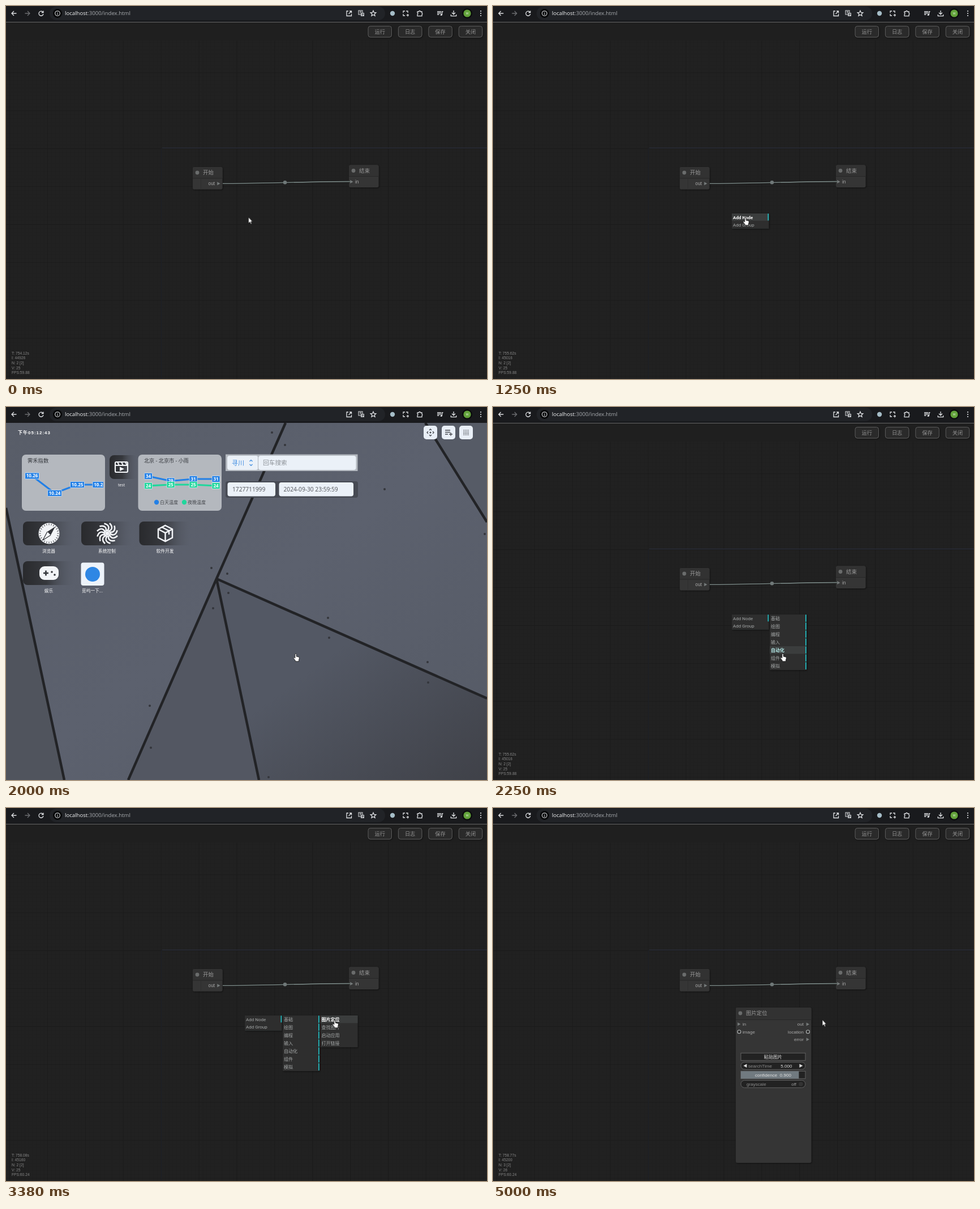
These frames come from a looping animation (850 px wide and 658 px high, 5130 ms). An HTML page:

```html
<!DOCTYPE html>
<html lang="zh">
<head>
<meta charset="utf-8">
<title>Node editor</title>
<style>
html, body { margin: 0; width: 100%; height: 100%; overflow: hidden; background: #212121; }
svg { display: block; width: 850px; height: 658px; }
text { white-space: pre; }
.ui { font-family: "Open Sans", "Noto Sans CJK SC", "Noto Sans CJK", sans-serif; }
.cv { font-family: "Liberation Sans", "Noto Sans CJK SC", "Noto Sans CJK", sans-serif; }
.mn { font-family: Roboto, "Noto Sans CJK SC", "Noto Sans CJK", sans-serif; }
.t { animation: 5130ms step-end infinite; }

/* Visibility windows: hidden, shown, hidden again */
@keyframes menu1 { 0%, 75.63% { visibility: hidden } 14.62% { visibility: visible } }
@keyframes menu2 { 0%, 75.63% { visibility: hidden } 29.24% { visibility: visible } }
@keyframes menu3 { 0%, 75.63% { visibility: hidden } 51.27% { visibility: visible } }
@keyframes overAdd { 0%, 31.77% { visibility: hidden } 14.62% { visibility: visible } }
@keyframes overDraw { 0%, 34.11% { visibility: hidden } 31.77% { visibility: visible } }
@keyframes overInput { 0%, 36.65% { visibility: hidden } 34.11% { visibility: visible } }
@keyframes overAuto { 0%, 58.48% { visibility: hidden } 43.86% { visibility: visible } }
@keyframes overLaunch { 0%, 61.01% { visibility: hidden } 58.48% { visibility: visible } }
@keyframes overFind { 0%, 63.35% { visibility: hidden } 61.01% { visibility: visible } }
@keyframes overLocate { 0%, 75.63% { visibility: hidden } 63.35% { visibility: visible } }
@keyframes desk { 0%, 43.86% { visibility: hidden } 38.99% { visibility: visible } }
@keyframes added { 0% { visibility: hidden } 75.63% { visibility: visible } }
@keyframes stats1 { 0% { visibility: visible } 14.62% { visibility: hidden } }
@keyframes stats2 { 0%, 63.35% { visibility: hidden } 14.62% { visibility: visible } }
@keyframes stats3 { 0%, 75.63% { visibility: hidden } 63.35% { visibility: visible } }
@keyframes arrow { 0%, 75.63% { visibility: visible } 14.62% { visibility: hidden } }
@keyframes hand { 0%, 75.63% { visibility: hidden } 14.62% { visibility: visible } }
@keyframes pointer {
  0% { transform: translate(428.5px, 372.5px) }
  24.37% { transform: translate(446px, 373px) }
  29.24% { transform: translate(470px, 375px) }
  31.77% { transform: translate(492px, 384px) }
  34.11% { transform: translate(505px, 411px) }
  36.65% { transform: translate(512px, 435px) }
  53.61% { transform: translate(518px, 431px) }
  56.14% { transform: translate(535px, 426px) }
  58.48% { transform: translate(560px, 402px) }
  61.01% { transform: translate(572px, 387px) }
  63.35% { transform: translate(578px, 378px) }
  65.89% { transform: translate(581px, 374px) }
  75.63%, 100% { transform: translate(582px, 373.5px) }
}
</style>
</head>
<body>
<svg id="stage" viewBox="0 0 850 658"></svg>
<script>
const rect = (x, y, w, h, fill, extra = '') =>
  `<rect x="${x}" y="${y}" width="${w}" height="${h}" fill="${fill}" ${extra}/>`;
const dot = (x, y, r, fill, extra = '') =>
  `<circle cx="${x}" cy="${y}" r="${r}" fill="${fill}" ${extra}/>`;
const line = (d, stroke, width = 1, extra = '') =>
  `<path d="${d}" fill="none" stroke="${stroke}" stroke-width="${width}" ${extra}/>`;
const shape = (d, fill, extra = '') => `<path d="${d}" fill="${fill}" ${extra}/>`;
// y is the middle of the line of text
const text = (x, y, str, size, fill, extra = '') =>
  `<text x="${x}" y="${(y + size * .36).toFixed(2)}" font-size="${size}" fill="${fill}" ${extra}>${str}</text>`;
const timed = (name, body) => `<g class="t" style="animation-name:${name}">${body}</g>`;
const at = (x, y, body) => `<g transform="translate(${x} ${y})">${body}</g>`;
const mid = 'text-anchor="middle"', end = 'text-anchor="end"', bold = 'font-weight="700"';
const shade = 'filter="url(#shade)"';

const defs = `<defs>
  <filter id="shade" x="-20%" y="-20%" width="140%" height="140%">
    <feDropShadow dx="1" dy="1" stdDeviation="1.6" flood-color="#000" flood-opacity=".5"/></filter>
  <pattern id="fine" width="6.69" height="6.69" patternUnits="userSpaceOnUse" x="6.5" y="50.5">
    <path d="M0 .5H6.69M.5 0V6.69" stroke="#1f1f1f"/></pattern>
  <pattern id="coarse" width="66.9" height="66.9" patternUnits="userSpaceOnUse" x="6" y="50.4">
    <path d="M0 .5H66.9M.5 0V66.9" stroke="#1b1b1b"/></pattern>
  <linearGradient id="fade"><stop stop-color="#292a2d"/><stop offset=".45" stop-color="#36383d"/>
    <stop offset="1" stop-color="#565b66" stop-opacity="0"/></linearGradient>
  <linearGradient id="wall" x2="1" y2="1"><stop stop-color="#585d68"/>
    <stop offset=".5" stop-color="#5c616e"/><stop offset="1" stop-color="#555a65"/></linearGradient>
  <linearGradient id="corner" x2="1" y2="1"><stop offset=".4" stop-color="#535864"/>
    <stop offset="1" stop-color="#3f4148"/></linearGradient>
  <clipPath id="card"><rect x="28" y="84" width="144" height="99"/></clipPath>
</defs>`;

function toolbar() {
  const ink = '#dfe1e4';
  const icon = (x, d, color = ink) => at(x, 13, line(d, color, 1.3));
  return rect(0, 0, 850, 28, '#191a1d') + rect(77, 1, 593, 24, '#212327', 'rx="12"') +
    icon(14, 'M4.5 0H-4M0-4L-4 0L0 4') + icon(38, 'M-4.5 0H4M0-4L4 0L0 4', '#6d6f72') +
    icon(62, 'M3.4-2A4 4 0 1 0 4 1M4-4.5V-1.4H.8') +
    dot(91, 13, 8, '#08090a') + dot(91, 13, 4.3, 'none', `stroke="${ink}" stroke-width="1.1"`) +
    line('M91 12.4V15.6M91 10.4V11.4', ink, 1.1) +
    `<g class="ui">${text(104, 12.6, 'localhost<tspan fill="#a9acb0">:3000/index.html</tspan>', 9.6, '#f1f2f3')}</g>` +
    icon(606, 'M-1-4H-4V4.5H4.5V1M1-4H4.5V-.5M4.5-4L-.5 1') +
    at(628, 13, rect(-5, -5, 7, 7, 'none', `stroke="${ink}"`) + rect(-1, -1, 6, 6, '#bfc2c5') +
      line('M-3.5-3H.5M-1.5-4V-3M-3 0L0-3', ink, .8) + line('M.5 1H4M1 4L3.5 1', '#212327', .9)) +
    icon(649, 'M0-4.8L1.4-1.6L4.8-1.3L2.2 .9L3 4.4L0 2.5L-3 4.4L-2.2 .9L-4.8-1.3L-1.4-1.6Z') +
    dot(683, 13, 4.2, '#a5bcc6') +
    icon(706, 'M-4-1V-4H-1M1-4H4V-1M-4 1V4H-1M4 1V5.5M1.5 3.2H6') +
    icon(731, 'M-4-3H-1.5A1.5 1.5 0 0 1 1.5-3H4V-.5A1.5 1.5 0 0 1 4 2.2V4.6H-4V2A1.5 1.5 0 0 0-4-.8Z') +
    icon(767, 'M-5-3H2M-5-.5H2M-5 2H-1.5M3.5 2.5V-3H5.5') + dot(769.2, 15.5, 1.6, ink) +
    icon(791, 'M0-5V1.5M-3-1.2L0 1.8L3-1.2M-4.7 2V4.6H4.7V2') +
    dot(815, 13, 9, '#0b0c0d') + dot(815, 13, 6.6, '#62a23a') +
    `<g class="ui">${text(815, 13, 'W', 5.5, '#eef6e8', mid)}</g>` +
    [9, 13, 17].map(y => dot(839, y, 1.1, ink)).join('');
}

function board() {
  const buttons = ['运行', '日志', '保存', '关闭'].map((name, i) => {
    const x = 640 + i * 53.4;
    return rect(x, 35.5, 41.5, 19.5, '#292929', `rx="4" stroke="#5c5c5c" ${shade}`) +
      text(x + 20.7, 45.4, name, 9.2, '#949494', mid);
  }).join('');
  return rect(0, 28, 850, 630, '#212121') + rect(0, 61, 850, 597, 'url(#fine)') +
    rect(0, 61, 850, 597, 'url(#coarse)') + rect(0, 29, 850, 32, '#1f1f1f') +
    line('M0 28.5H850', '#666') + line('M274.5 658V250.5', '#1c2028') +
    line('M276 250.5H850', '#2c3040') + `<g class="ui">${buttons}</g>`;
}

const port = (x, y) => shape(`M${x - 2.3} ${y - 3}L${x + 3} ${y}L${x - 2.3} ${y + 3}Z`, '#757a7a');
const title = (x, y, name) => dot(x + 8, y + 10, 3.4, '#6a6c6c') + text(x + 18, y + 10, name, 9.4, '#9a9a9a');

function node(x, y, w, h, name, head = 20) {
  return rect(x, y, w, h, '#353535', `rx="3" ${shade}`) +
    shape(`M${x} ${y + head}V${y + 3}q0-3 3-3H${x + w - 3}q3 0 3 3V${y + head}Z`, '#323232') +
    line(`M${x} ${y + head}H${x + w}`, '#262626') + title(x, y, name);
}

function graph() {
  const link = 'M383 313.2C440 313.2 545 309.6 608 309.6';
  return node(330, 284, 52.5, 39.5, '开始') + node(606, 280.5, 52.5, 39.5, '结束') +
    line(link, '#181818', 3.4) + line(link, '#74817f', 1.6) + dot(493, 311.2, 3.3, '#6f7878') +
    line('M344.5 305V322', '#2e2e2e') + port(375.5, 313.3) + port(610.5, 310) +
    text(369, 313.3, 'out', 8.2, '#aaa', end) + text(617, 310, 'in', 8.2, '#aaa');
}

function stats(name, time, frame, nodes, version, fps) {
  const rows = [`T: ${time}s`, `I: ${frame}`, `N: ${nodes} [2]`, `V: ${version}`, `FPS:${fps}`];
  return timed(name, rows.map((row, i) => text(10, 612.2 + i * 8.7, row, 6.7, '#878787')).join(''));
}

function locator() {
  const field = (y, rx, fill = '#222') =>
    rect(438, y, 114, 13, fill, `rx="${rx}" stroke="#666" stroke-width=".9"`);
  const ring = (x, y) => dot(x, y, 3, '#2b2b2b', 'stroke="#b4b8b8" stroke-width="1.1"');
  return node(429, 352, 133.5, 274, '图片定位', 21.5) +
    port(434.5, 381.3) + text(441, 381.3, 'in', 8.1, '#aaa') +
    ring(435, 394.8) + text(441, 394.8, 'image', 8.1, '#aaa') +
    text(549, 381.3, 'out', 8.1, '#aaa', end) + port(556, 381.5) +
    text(549, 394.8, 'location', 8.1, '#aaa', end) + ring(556.5, 394.8) +
    text(549, 408.2, 'error', 8.1, '#aaa', end) + port(556, 408.2) +
    field(432.3, 0) + text(495, 438.6, '粘贴图片', 8.1, '#e4e4e4', mid) +
    field(448.3, 6.5) + text(451, 454.7, 'searchTime', 8.1, '#8c8c8c') +
    text(528.5, 454.7, '5.000', 8.1, '#ddd', end) +
    shape('M448.5 451.5V458L442.5 454.7ZM541.5 451.5V458L547.5 454.7Z', '#ddd') +
    field(464.3, 0) + rect(438, 464.3, 102.5, 13, '#717a80') +
    text(495, 470.7, 'confidence  0.900', 8.1, '#e0e0e0', mid) +
    field(480.4, 6.5) + text(448, 486.8, 'grayscale', 8.1, '#8c8c8c') +
    text(536, 486.8, 'off', 8.1, '#999', end) + dot(544, 487, 3.8, '#333');
}

// hovers: row index -> [keyframes, text colour]
function menu(name, x, w, step, rows, bars, hovers) {
  const items = rows.map((row, i) => {
    const y = 373 + i * step, top = 366 + i * step;
    let out = text(x + 2, y, row, 8, '#a5a8a8');
    if (hovers[i]) {
      const [key, color] = hovers[i];
      out += timed(key, rect(x, top, w, step - .6, '#3b3d3d') + text(x + 2, y, row, 8, color, bold));
    }
    if (bars > i) out += rect(x + w - 2, top + .3, 1.8, step - 1.4, '#22b8bd');
    return out;
  }).join('');
  return timed(name, rect(x, 366, w, rows.length * step, '#2d2f2f', shade) + items);
}

function menus() {
  return menu('menu1', 422, 65.5, 13.4, ['Add Node', 'Add Group'], 1, { 0: ['overAdd', '#fff'] }) +
    menu('menu2', 489, 65, 14, ['基础', '绘图', '编程', '输入', '自动化', '组件', '模拟'], 7,
      { 1: ['overDraw', '#fff'], 3: ['overInput', '#fff'], 4: ['overAuto', '#b4e8e6'] }) +
    menu('menu3', 555.5, 66, 14, ['图片定位', '查找图片', '启动应用', '打开链接'], 0,
      { 0: ['overLocate', '#fff'], 1: ['overFind', '#fff'], 2: ['overLaunch', '#fff'] });
}

function wallpaper() {
  const screws = [[470, 45], [493, 67], [669, 145], [846, 224], [363, 284], [391, 294], [393, 328], [366, 355],
    [569, 372], [571, 407], [745, 450], [746, 486], [254, 527], [256, 601], [464, 653]];
  return rect(0, 28, 850, 630, 'url(#wall)') + shape('M0 178L103 658H0Z', '#50545d') +
    shape('M372 303L447 658H216Z', '#535762') + shape('M372 303L850 514V658H447Z', 'url(#corner)') +
    shape('M741 28H850V203Z', '#565b66') +
    line('M494 28L372 303L216 658M0 178L103 658M372 303L447 658M372 303L850 514M741 28L850 203', '#222326', 4.5) +
    screws.map(([x, y]) => dot(x, y, 2, '#34363b')).join('');
}

function series(points, labels, color, w) {
  return line('M' + points.join('L'), color, 3.2) + points.map(([x, y], i) =>
    rect(x - w / 2, y - 5.5, w, 11, color, 'rx="1" stroke="#e6edf5" stroke-width=".7"') +
    text(x, y, labels[i], 8, '#fff', `${mid} ${bold}`)).join('');
}

function icons() {
  const w = '#f2f4f7';
  const turn = (n, make) => Array.from({ length: n }, (_, i) =>
    `<g transform="rotate(${i * 360 / n})">${make}</g>`).join('');
  const compass = dot(0, 0, 18.5, w) + turn(24, line('M0-17.5V-14.5', '#44464b', 1)) +
    shape('M11-12L3 3L-3-3Z', '#33353a') + line('M-11 12L3 3M-11 12L-3-3', '#33353a', 1.3);
  const swirl = turn(12, line('M1-4C8-5 11-11 4-18', w, 2.6)) + dot(0, 0, 3.5, w);
  const cube = line('M0-14L12.5-7.5V7.5L0 14L-12.5 7.5V-7.5ZM-12.5-7.5L0-1L12.5-7.5M0-1V14M-6-11L6.5-4.5V2', w, 2.5);
  const pad = rect(-17, -12, 34, 24, w, 'rx="9"') + line('M-10 0H-1M-5.5-4.5V4.5', '#33353a', 2.6) +
    dot(5, -2, 1.8, '#33353a') + dot(10, 3, 1.8, '#33353a');
  const clap = rect(-11, -9, 22, 18, 'none', `rx="2" stroke="${w}" stroke-width="2.2"`) +
    line('M-11-3H11M-7-9L-4-3M0-9L3-3M7-9L10-3', w, 2) + shape('M-3-.5L5 3.2L-3 7Z', w);
  const tile = (x, y, art, name) => rect(x - 46, y - 21, 92, 42, 'url(#fade)', 'rx="8"') + at(x, y, art) +
    text(x - .5, y + 31, name, 7.7, '#fff', mid);
  return rect(183, 85, 50, 42, 'url(#fade)', 'rx="8"') + at(204, 106, clap) + text(204, 137, 'test', 7, '#fff', mid) +
    tile(76, 223, compass, '浏览器') + tile(179, 223, swirl, '系统控制') + tile(281.5, 223, cube, '软件开发') +
    tile(76, 293, pad, '娱乐') + rect(132.5, 274.5, 41, 40.5, '#edf3fa', 'rx="4"') +
    dot(153, 295, 13, '#2f87e4') + text(152.5, 324, '觅屿一下...', 7.7, '#fff', mid);
}

function desktop() {
  const blue = '#2380e6', green = '#20d79c', ink = '#45484d';
  const box = (x, y, w, h) => rect(x, y, w, h, '#ebf1f8', 'rx="4"');
  const dots = [-4, -1.3, 1.4, 4].flatMap(x => [-4, -1.3, 1.4, 4].map(y => dot(x, y, .8, ink))).join('');
  return wallpaper() + `<g class="ui">` +
    text(21, 45, '下午05:12:43', 8, '#fff', `${bold} letter-spacing="1" class="cv"`) +
    [738, 770, 801].map(x => rect(x, 33, 24, 24, '#e9eff7', 'rx="5"')).join('') +
    at(750, 45, dot(0, 0, 1.5, ink) + line('M-2-4L0-6L2-4M-2 4L0 6L2 4M-4-2L-6 0L-4 2M4-2L6 0L4 2', ink, 1.3)) +
    at(782, 45, line('M-6-4H3M-6-.5H3M-6 3H-1M4 0V6M1 3H7', ink, 1.3)) + at(813, 45, dots) +
    rect(28, 84, 147, 99, '#b4b8be', 'rx="7"') + rect(233.5, 84, 147.5, 99, '#b4b8be', 'rx="7"') +
    text(38, 95, '霁禾指数', 9.3, '#34373c') +
    `<g clip-path="url(#card)">${series([[46, 121.5], [86, 152], [126, 137], [165.5, 137]],
      ['10.26', '10.24', '10.25', '10.25'], blue, 25)}</g>` +
    text(244, 95, '北京 - 北京市 - 小雨', 9.1, '#34373c') +
    series([[251.5, 122], [291, 130.5], [331, 127], [371, 127]], [34, 29, 31, 31], blue, 14) +
    series([[251.5, 139], [291, 137], [331, 137], [371, 139]], [24, 25, 25, 24], green, 14) +
    dot(266, 168, 4.2, blue) + text(272, 168, '白天温度', 8, ink) +
    dot(315, 168, 4.2, green) + text(321, 168, '夜晚温度', 8, ink) +
    rect(388, 83.5, 233.5, 29.5, '#b3b8bf') + box(391, 86, 54.5, 25) + box(446, 86, 172.5, 25) +
    line('M445.5 86V111', '#b3b8bf') + text(399, 98.6, '寻川', 11, '#3a8ae0') +
    line('M430.5 96L433 93.5L435.5 96M430.5 101L433 103.5L435.5 101', '#3a8ae0', 1.2) +
    text(454, 98.6, '回车搜索', 10.7, '#8d9298') +
    rect(388, 131, 234, 29, '#464a53', 'rx="4"') + box(391.5, 133, 84.5, 24.5) + box(482.5, 133, 131.5, 24.5) +
    text(400, 145.3, '1727711999', 10.2, '#505359') + text(490.5, 145.3, '2024-09-30 23:59:59', 10.2, '#505359') +
    icons() + `</g>`;
}

function pointer() {
  const rim = 'stroke="#111" stroke-width=".8" stroke-linejoin="round"';
  return `<g class="t" style="animation-name:pointer">` +
    timed('arrow', shape('M0 0V10.8L2.5 8.6L4.2 12.2L5.9 11.4L4.2 7.9H7.3Z', '#fff', rim)) +
    timed('hand', shape('M-1.2.8Q0-.8 1.2.8V5L5.2 6Q6.6 6.5 6.4 8L5.5 11.5V13.8H-.8V12L-4 8.2Q-4.4 6.6-2.8 6.8L-1.2 8Z',
      '#fff', rim)) + `</g>`;
}

document.getElementById('stage').innerHTML = defs + board() + `<g class="cv">` + graph() +
  stats('stats1', '754.12', 44926, 2, 25, '59.88') + stats('stats2', '755.62', 45016, 2, 25, '59.88') +
  stats('stats3', '758.08', 45160, 2, 25, '60.24') + stats('added', '758.77', 45200, 3, 26, '60.24') +
  timed('added', locator()) + `</g><g class="mn">` + menus() + `</g>` +
  timed('desk', desktop()) + toolbar() + pointer();
</script>
</body>
</html>
```
